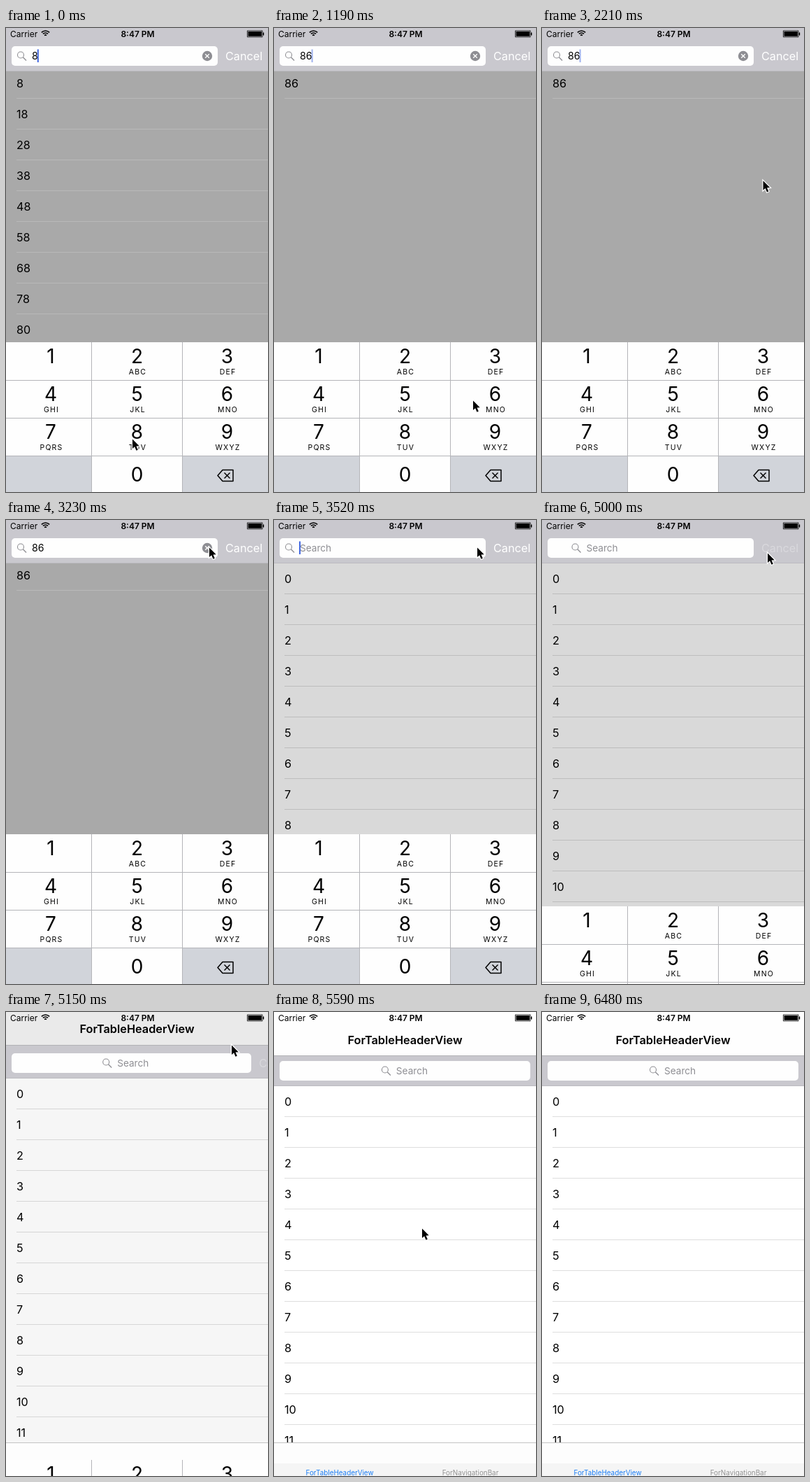
An HTML page with a canvas for the animation above (7.17 s loop, 375 by 663 pixels).

```html
<!DOCTYPE html>
<html lang="en">
<head>
<meta charset="utf-8">
<title>Search</title>
<style>
html, body { margin: 0; width: 100%; height: 100%; overflow: hidden; background: #fff; }
canvas { display: block; }
</style>
</head>
<body>
<canvas id="stage" width="375" height="663"></canvas>
<script>
const ctx = document.getElementById('stage').getContext('2d');
const W = 375, H = 663, LOOP = 7170, STEP = 147.1, ROW = 44;
const BAR = '#c9c8ce', KEY_GREY = '#d1d4da', GREY = '#8e8e93';

// Steps at which the user acts
const PRESS = 4, TYPE = 5, CLEAR = 24, CANCEL = 34, LAST = 44;

// Pointer moves to x, y between two steps; bowX and bowY bend the path
const MOVES = [
  { from: 0, to: 2, x: 284, y: 532 },
  { from: 8, to: 12, x: 300, y: 262 },
  { from: 13, to: 20, x: 290, y: 39, bowX: 30 },
  { from: 27, to: 31, x: 322, y: 47, bowY: 29 },
  { from: 35, to: 38, x: 211, y: 309 },
  { from: 39, to: LAST, x: 340, y: 670 }
];
const KEYS = ['1', '2ABC', '3DEF', '4GHI', '5JKL', '6MNO', '7PQRS', '8TUV', '9WXYZ', '', '0', ''];
const KEY_EDGES = [0, 123, 253, 376], KEY_CENTERS = [64, 187.5, 316.5];

const lerp = (a, b, p) => a + (b - a) * p;
const clamp = v => Math.min(Math.max(v, 0), 1);
const grey = v => `rgb(${v},${v},${v})`;

function rect(x, y, w, h, color) {
  ctx.fillStyle = color;
  ctx.fillRect(x, y, w, h);
}

function line(points, color, width, close) {
  ctx.beginPath();
  points.forEach(([x, y]) => ctx.lineTo(x, y));
  if (close) ctx.closePath();
  ctx.strokeStyle = color;
  ctx.lineWidth = width;
  ctx.stroke();
}

function cross(x, y, r, color, width) {
  line([[x - r, y - r], [x + r, y + r]], color, width);
  line([[x + r, y - r], [x - r, y + r]], color, width);
}

// y is the middle of the capital letters
function text(str, x, y, size, color = '#000', align = 'left', weight = 400, spacing = 0) {
  ctx.font = `${weight} ${size}px Inter, sans-serif`;
  ctx.letterSpacing = spacing + 'px';
  ctx.textAlign = align;
  ctx.fillStyle = color;
  ctx.fillText(str, x, Math.round(y + size * .364));
}

function list(items, top, line) {
  items.forEach((item, i) => {
    const y = top + i * ROW;
    text(item, 15, y + 22, 16.2);
    rect(15, y + ROW - 1, W - 15, 1, line);
  });
}

function status() {
  text('Carrier', 6, 8.5, 12);
  text('8:47 PM', 188.5, 8.5, 12, '#000', 'center', 600);
  ctx.strokeStyle = '#000';
  ctx.lineWidth = 1.7;
  for (let r = 2; r < 9; r += 3) {
    ctx.beginPath();
    ctx.arc(56.5, 12, r, -Math.PI * .75, -Math.PI * .25);
    ctx.stroke();
  }
  ctx.lineWidth = .8;
  ctx.strokeRect(345.4, 3.9, 21.6, 9);
  rect(346.5, 5, 19.4, 6.8, '#000');
  rect(367.6, 6.5, 1.6, 4, '#000');
}

function tabs() {
  rect(0, 615, W, 48, '#fdfdfd');
  rect(0, 645, W, 18, '#f5f5f5');
  rect(0, 615, W, 1, '#c4c4c4');
  text('ForTableHeaderView', 94, 658, 9.9, '#1a7df5', 'center');
  text('ForNavigationBar', 281, 658, 9.9, '#929292', 'center');
}

function keyboard(top, pressed) {
  rect(0, top, W, 216, '#b4b5b9');
  KEYS.forEach((key, i) => {
    const col = i % 3, x = KEY_EDGES[col], cx = KEY_CENTERS[col];
    const y = top + Math.floor(i / 3) * 54, gap = i > 2 ? 1 : 0;
    const plain = key && key[0] !== pressed;
    rect(x, y + gap, KEY_EDGES[col + 1] - x - 1, 54 - gap, plain ? '#fefefe' : KEY_GREY);
    if (!key) return;
    text(key[0], cx, y + (key === '0' ? 27 : 20), 28, '#000', 'center');
    text(key.slice(1), cx + 1, y + 42, 10.5, '#000', 'center', 400, 1.2);
  });
  const y = top + 190.5;
  ctx.lineJoin = 'round';
  line([[303, y], [310, y - 8], [325, y - 8], [325, y + 8], [310, y + 8]], '#000', 1.5, true);
  cross(316.5, y, 4, '#000', 1.5);
}

// The caret stays solid after an edit, then fades out and in
function caretAlpha(step) {
  const edit = step < TYPE ? step : step < CLEAR ? TYPE : CLEAR;
  const n = (step - edit) % 6.5;
  return n < 3 ? 1 : n < 4 || n > 5.8 ? .5 : 0;
}

function searchField(step, query, y, width, icon) {
  const mid = y + 14;
  ctx.fillStyle = '#fefefe';
  ctx.beginPath();
  ctx.roundRect(8, y, width, 28, 5);
  ctx.fill();
  ctx.strokeStyle = GREY;
  ctx.lineWidth = 1.1;
  ctx.beginPath();
  ctx.arc(icon + 5, mid - 1.5, 4.5, 0, 7);
  ctx.stroke();
  line([[icon + 8.3, mid + 1.8], [icon + 13, mid + 6.5]], GREY, 1.3);
  if (query) {
    text(query, icon + 21, mid, 14.2);
    ctx.fillStyle = GREY;
    ctx.beginPath();
    ctx.arc(288, mid, 7.2, 0, 7);
    ctx.fill();
    cross(288, mid, 2.8, '#fff', 1.3);
  } else {
    text('Search', icon + 21, mid, 13.6, GREY);
  }
  if (step < CANCEL) {
    ctx.globalAlpha = caretAlpha(step);
    rect(36 + query.length * 8.8, mid - 9.5, 2, 18.5, '#4268e0');
    ctx.globalAlpha = 1;
  }
}

function pointer(step) {
  let x = 180, y = 587;
  for (const m of MOVES) {
    const t = clamp((step - m.from) / (m.to - m.from));
    const p = t * t * (3 - 2 * t), bow = Math.sin(Math.PI * p);
    x = lerp(x, m.x, p) + bow * (m.bowX || 0);
    y = lerp(y, m.y, p) + bow * (m.bowY || 0);
  }
  ctx.save();
  ctx.translate(x + .5, y);
  ctx.lineJoin = 'miter';
  line([[.5, .5], [.5, 14], [3.6, 11.2], [6, 16.7], [8.3, 15.7], [6, 10.4], [10.2, 10.2]], '#fff', 2.4, true);
  ctx.fillStyle = '#000';
  ctx.fill();
  ctx.restore();
}

function draw(time) {
  const step = Math.min(Math.floor((time % LOOP + 10) / STEP), LAST);
  const query = step < TYPE ? '8' : step < CLEAR ? '86' : '';
  const numbers = Array.from({ length: 100 }, (_, i) => String(i));

  // After cancelling, each part decays towards its closed place
  const closing = (left, decay) => step < CANCEL ? 0 : 1 - left * decay ** (step - CANCEL);
  const p = closing(1, .25);
  const width = lerp(295, 359, p);
  const icon = lerp(16, width / 2 - 25.5, closing(.75, .08));
  const keyTop = Math.round(lerp(449, 665, closing(.523, .22)));
  const top = Math.round(lerp(62, 106, p)), navBottom = Math.round(62 * p);

  if (query) {
    rect(0, 0, W, H, '#a9a9a9');
    list(numbers.filter(n => n.includes(query)), 57, '#b9b9b9');
  } else {
    rect(0, 0, W, H, grey(lerp(217, 255, p)));
    list(numbers.slice(0, 13), top, 'rgba(0,0,0,.13)');
  }
  tabs();

  rect(0, 0, W, top, BAR);
  rect(0, top - 1, W, 1, '#bcbbc0');
  if (p) {
    rect(0, 0, W, navBottom, grey(lerp(175, 254, p)));
    rect(0, navBottom, W, 1, '#b2b2b5');
    text('ForTableHeaderView', 187.5, 62 * p - 22, 16.3, '#000', 'center', 600);
  }
  searchField(step, query, Math.round(lerp(26, 70, p)), width, icon);
  text('Cancel', lerp(314, 378, p), lerp(40, 84, p), 16.2, `rgba(255,255,255,${step < CANCEL ? 1 : .3})`);
  status();
  keyboard(keyTop, step === PRESS ? '6' : '');
  pointer(step);
}

function tick() {
  draw(performance.now());
  requestAnimationFrame(tick);
}
tick();
</script>
</body>
</html>
```
